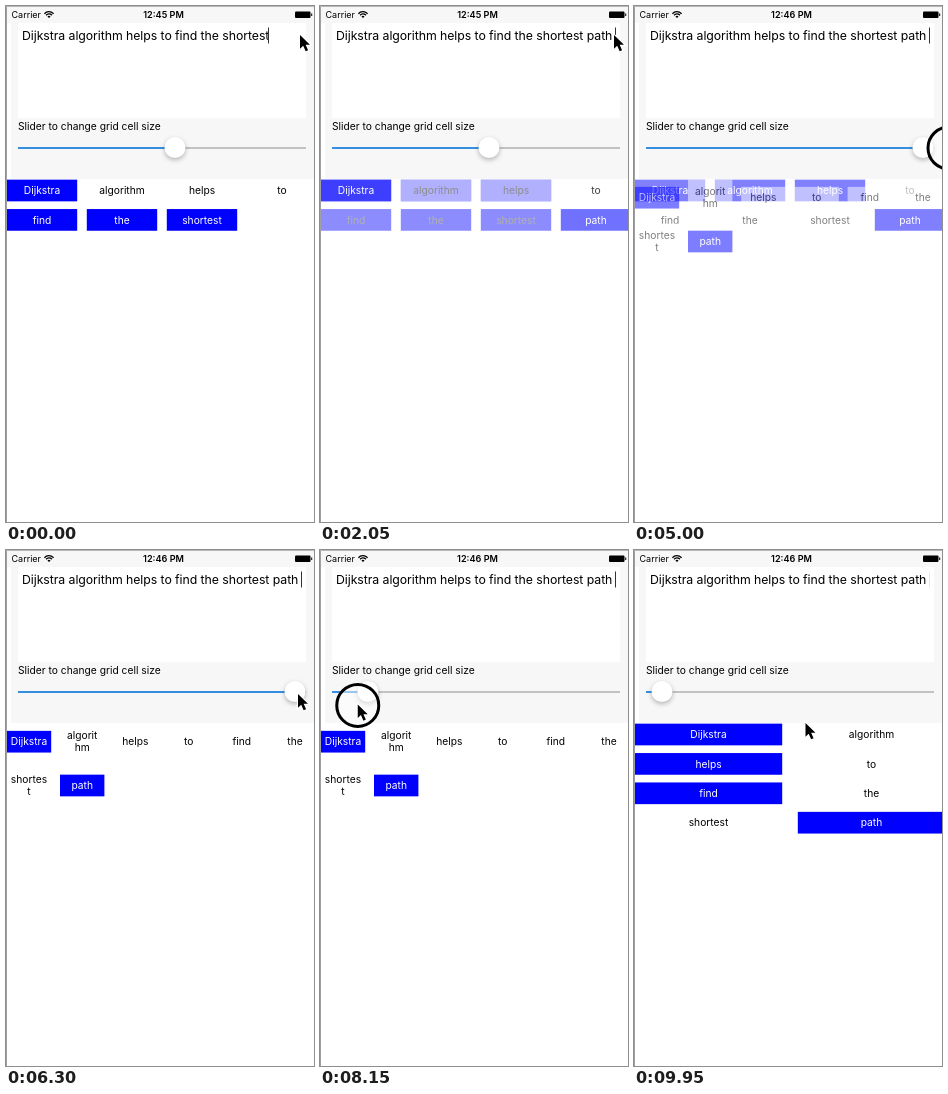
Write an HTML page with a canvas that moves like this. It is 308x516 px and loops after 10000 ms.

```html
<!DOCTYPE html>
<html>
<head>
<meta charset="utf-8">
<style>
html, body { margin: 0; width: 308px; height: 516px; overflow: hidden; background: #fff; }
canvas { display: block; }
</style>
</head>
<body>
<canvas id="stage" width="308" height="516"></canvas>
<script>
const W = 308, H = 516, LOOP = 10000, FADE = 300;
const ctx = document.getElementById('stage').getContext('2d');
const words = 'Dijkstra algorithm helps to find the shortest path'.split(' ');

const clamp = (v, lo = 0, hi = 1) => Math.min(hi, Math.max(lo, v));
const smooth = u => (u = clamp(u), u * u * (3 - 2 * u));

// Interpolates [time, ...values] keys with an ease between neighbours.
function track(keys, t) {
  let i = keys.findIndex(k => k[0] > t);
  if (i < 0) i = keys.length;
  const a = keys[Math.max(0, i - 1)], b = keys[Math.min(i, keys.length - 1)];
  const u = a === b ? 0 : smooth((t - a[0]) / (b[0] - a[0]));
  return a.slice(1).map((v, j) => v + (b[j + 1] - v) * u);
}

function text(c, str, x, y, size, { color = '#000', align = 'left', weight = 400, spacing = 0 } = {}) {
  c.font = `${weight} ${size}px Inter, sans-serif`;
  c.letterSpacing = spacing + 'px';
  c.textAlign = align;
  c.textBaseline = 'alphabetic';
  c.fillStyle = color;
  c.fillText(str, x, y);
  return c.measureText(str).width;
}

function rect(c, color, x, y, w, h) {
  c.fillStyle = color;
  c.fillRect(x, y, w, h);
}

// blue: one flag per word; breaks: cell texts that wrap.
const grids = [
  { start: -FADE, cols: 4, pitch: 80, w: 70, mid: 184.5, row: 29.4, blue: '1000111' },
  { start: 1890, cols: 4, pitch: 80, w: 70, mid: 184.5, row: 29.4, blue: '11100001', oldOnTop: true },
  { start: 4850, cols: 6, pitch: 53.2, w: 44, mid: 191.7, row: 43.8, blue: '10000001',
    breaks: { algorithm: ['algorit', 'hm'], shortest: ['shortes', 't'] } },
  { start: 8750, cols: 2, pitch: 163, w: 147, mid: 184.5, row: 29.4, blue: '10101001' }
];

function renderGrid(g) {
  const layer = document.createElement('canvas');
  layer.width = W;
  layer.height = H;
  const c = layer.getContext('2d');
  [...g.blue].forEach((flag, i) => {
    const on = flag === '1';
    const lines = g.breaks?.[words[i]] ?? [words[i]];
    const x = 0.8 + g.pitch * (i % g.cols), w = g.w + 0.4;
    const mid = g.mid + g.row * Math.floor(i / g.cols);
    const h = 21.7 + 14.5 * (lines.length - 1);
    rect(c, on ? '#00f' : '#fff', x, mid - h / 2, w, h);
    lines.forEach((line, n) => text(c, line, x + w / 2,
      Math.round(mid + 3.6 + 12 * (n - (lines.length - 1) / 2)), 10.25,
      { color: on ? '#fff' : '#000', align: 'center' }));
  });
  return layer;
}
grids.forEach(g => g.layer = renderGrid(g));

function drawGrids(t) {
  const i = grids.findLastIndex(g => t >= g.start);
  const g = grids[i], u = smooth((t - g.start) / FADE);
  const layers = [[g.layer, u]];
  if (u < 1) layers[g.oldOnTop ? 'push' : 'unshift']([grids[i - 1].layer, 1 - u]);
  for (const [layer, alpha] of layers) {
    ctx.globalAlpha = alpha;
    ctx.drawImage(layer, 0, 0);
  }
  ctx.globalAlpha = 1;
}

function drawStatusBar(t) {
  rect(ctx, '#f7f7f7', 0, 0, W, 17);
  text(ctx, 'Carrier', 5.5, 12, 9);
  text(ctx, t < 4000 ? '12:45 PM' : '12:46 PM', 157.5, 12, 9.1, { align: 'center', weight: 600 });
  ctx.strokeStyle = ctx.fillStyle = '#000';
  ctx.lineWidth = 1.3;
  for (const r of [6.3, 4]) {
    ctx.beginPath();
    ctx.arc(43, 12, r, -Math.PI * 0.76, -Math.PI * 0.24);
    ctx.stroke();
  }
  ctx.beginPath();
  ctx.moveTo(43, 12);
  ctx.arc(43, 12, 2.2, -Math.PI * 0.76, -Math.PI * 0.24);
  ctx.fill();
  ctx.beginPath();
  ctx.roundRect(289, 5.5, 15.5, 6.5, 1);
  ctx.fill();
  ctx.fillRect(305.2, 7.5, 1, 2.5);
}

const keyTimes = [950, 1100, 1300, 1450, 1650, 1890];

function caretAlpha(t) {
  if (t < 900) return 1 - smooth((t - 25) / 125) + smooth((t - 425) / 125);
  if (t < 2450) return 1;
  const p = t % 1000;
  return p < 750 ? 1 - smooth((p - 475) / 125) : smooth((p - 925) / 125);
}

function drawTextView(t) {
  rect(ctx, '#f7f7f7', 5, 17, W - 5, 156);
  rect(ctx, '#fff', 12, 17, 288, 95);
  const typed = ' path '.slice(0, keyTimes.filter(k => t >= k).length);
  const width = text(ctx, words.slice(0, 7).join(' ') + typed, 16, 34.3, 12.3, { spacing: -0.06 });
  ctx.globalAlpha = caretAlpha(t);
  rect(ctx, '#333', Math.floor(15.5 + width), 21.5, 1, 16);
  ctx.globalAlpha = 1;
  text(ctx, 'Slider to change grid cell size', 12, 124.4, 10.25);
}

const pointerKeys = [
  [2500, 294, 29], [3150, 171, 143], [3800, 169, 143.5], [4590, 315, 141],
  [5450, 315, 141], [6200, 292, 144], [6950, 292, 144], [8350, 23, 155],
  [8950, 23, 155], [9800, 171.5, 173]
];

function thumbX(t) {
  if (t < 3800) return 169;
  if (t < 6950) return clamp(track(pointerKeys, Math.min(t - 40, 5000))[0], 169, 289);
  return clamp(track(pointerKeys, Math.min(t - 64, 8600))[0], 28, 289);
}

function drawSlider(t) {
  const x = thumbX(t);
  rect(ctx, '#b6b6b6', 12, 141.2, 288, 1.6);
  rect(ctx, '#1583e6', 12, 141.2, x - 12, 1.6);
  ctx.save();
  ctx.shadowColor = 'rgba(0,0,0,.28)';
  ctx.shadowBlur = 5;
  ctx.shadowOffsetY = 2;
  ctx.fillStyle = '#fff';
  ctx.beginPath();
  ctx.arc(x, 141.5, 10.5, 0, Math.PI * 2);
  ctx.fill();
  ctx.restore();
}

const arrow = new Path2D('M0 0V14.5L3.4 11.4L6 17.3L8.6 16.2L6 10.5H10.6Z');

function drawPointer(t) {
  const [x, y] = track(pointerKeys, t);
  if (t > 3800 && t < 5250 || t > 6950 && t < 8600) {
    ctx.beginPath();
    ctx.arc(x, y + 1, 21, 0, Math.PI * 2);
    ctx.fillStyle = 'rgba(255,255,255,.5)';
    ctx.fill();
    ctx.strokeStyle = '#000';
    ctx.lineWidth = 3;
    ctx.stroke();
  }
  ctx.save();
  ctx.translate(x, y);
  ctx.scale(0.94, 0.94);
  ctx.strokeStyle = '#fff';
  ctx.lineWidth = 2.4;
  ctx.stroke(arrow);
  ctx.fillStyle = '#000';
  ctx.fill(arrow);
  ctx.restore();
}

function draw() {
  const t = performance.now() % LOOP;
  rect(ctx, '#fff', 0, 0, W, H);
  drawStatusBar(t);
  drawTextView(t);
  drawSlider(t);
  drawGrids(t);
  rect(ctx, '#a0a0a0', 0, 0, 1, H);
  rect(ctx, '#b8b8b8', 0, 0, W, 1);
  drawPointer(t);
  requestAnimationFrame(draw);
}
draw();
</script>
</body>
</html>
```
